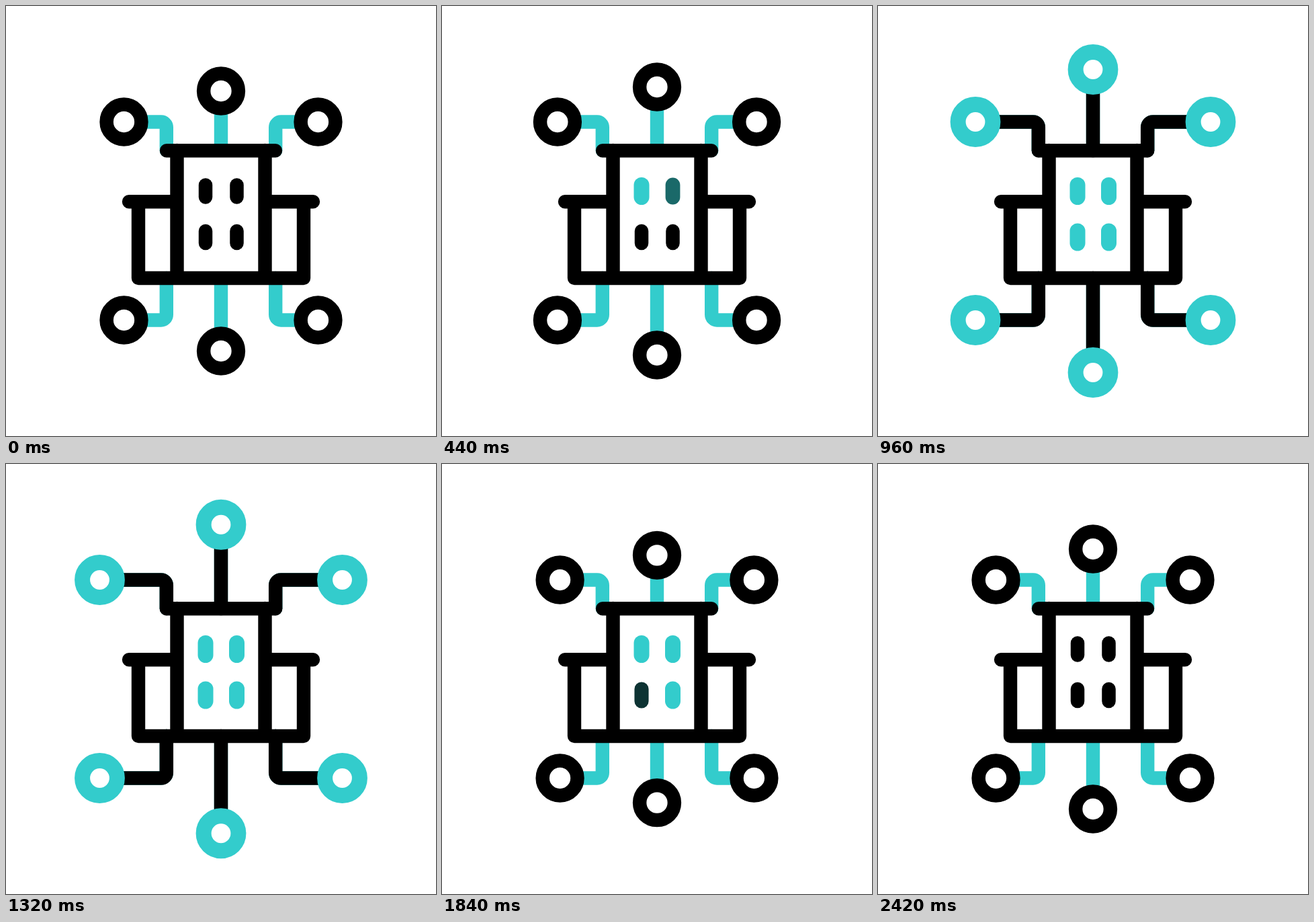
Animation, 640 px wide and 640 px high, one loop 2800 ms. Source, as an HTML page with a canvas:

```html
<!DOCTYPE html>
<html>
<head>
<meta charset="utf-8">
<style>
  html, body { margin: 0; width: 100%; height: 100%; overflow: hidden; background: #fff; }
  canvas { display: block; }
</style>
</head>
<body>
<canvas id="stage" width="640" height="640"></canvas>
<script>
const ctx = document.getElementById('stage').getContext('2d');
const LOOP = 2800, TEAL = 'rgb(51,204,204)', BLACK = '#000';

// [time, offset] keys: positive moves a node towards the building
const SIDE = [[0, 0], [200, 14], [540, -12.5], [660, -20], [960, -30.5], [1080, -33],
  [1500, -37], [1690, -37], [1920, 14], [2040, 1], [2170, -9.5], [2420, 0]];
const MIDDLE = [[0, 0], [200, 14], [540, -15.5], [660, -22.5], [960, -32], [1080, -34],
  [1500, -37], [1630, -37], [1700, -31.5], [1880, 14], [2040, -5], [2160, -8.5], [2420, 0]];

// x, y, time of turning teal, time of turning black
const WINDOWS = [[297, 266.5, 240, 2100], [343.5, 266.5, 380, 1880],
  [343.5, 335, 520, 2220], [297, 335, 700, 1760]];

const smooth = (t, start, end) => {
  const u = Math.min(1, Math.max(0, (t - start) / (end - start)));
  return u * u * (3 - 2 * u);
};
const pulse = (t, on, off, length) => smooth(t, on, on + length) - smooth(t, off, off + length);
const mix = k => `rgb(${51 * k},${204 * k},${204 * k})`;

// Monotone cubic interpolation
function track(keys, t) {
  const last = keys.length - 1;
  if (t >= keys[last][0]) return keys[last][1];
  const slope = i => (keys[i + 1][1] - keys[i][1]) / (keys[i + 1][0] - keys[i][0]);
  const tangent = i => {
    if (i === 0 || i === last) return 0;
    const a = slope(i - 1), b = slope(i);
    return a * b > 0 ? 2 * a * b / (a + b) : 0;
  };
  const i = keys.findIndex(key => key[0] > t) - 1;
  const [t0, v0] = keys[i], [t1, v1] = keys[i + 1];
  const h = t1 - t0, u = (t - t0) / h, s = u * u * (3 - 2 * u);
  return v0 + (v1 - v0) * s
    + h * u * (1 - u) * ((1 - u) * tangent(i) - u * tangent(i + 1));
}

function stroke(color, width, trace) {
  ctx.strokeStyle = color;
  ctx.lineWidth = width;
  ctx.beginPath();
  trace();
  ctx.stroke();
}

function line(...points) {
  for (let i = 0; i < points.length; i += 2) ctx.lineTo(points[i], points[i + 1]);
}

function getLinks(t) {
  const side = track(SIDE, t), middle = track(MIDDLE, t);
  const links = [];
  for (const [base, dir] of [[215, -1], [405, 1]]) {
    const bendY = 320 + dir * 147.5, y = 320 + dir * (193.5 - middle);
    links.push({ x: 320, y, delay: 20, length: Math.abs(y - base),
      trace: () => line(320, base, 320, y) });
    for (const s of [-1, 1]) {
      const bendX = 320 + s * 81.2, x = 320 + s * (144.5 - side);
      links.push({ x, y: bendY, delay: 0,
        length: Math.abs(bendY - base) + Math.abs(x - bendX) - 3.4,
        trace: () => {
          ctx.moveTo(bendX, base);
          ctx.arcTo(bendX, bendY, x, bendY, 8);
          ctx.lineTo(x, bendY);
        } });
    }
  }
  return links;
}

function drawBuilding() {
  ctx.fillStyle = '#fff';
  ctx.fillRect(254.5, 215, 131, 190);
  stroke(BLACK, 20.4, () => {
    for (const s of [-1, 1]) {
      ctx.moveTo(320 + s * 65.5, 215);
      line(320 + s * 65.5, 405);
      ctx.moveTo(320 + s * 65.5, 291.3);
      line(320 + s * 137, 291.3);
      ctx.moveTo(320 + s * 123, 291.3);
      line(320 + s * 123, 405, 320, 405);
    }
    ctx.moveTo(239, 215.3);
    line(401, 215.3);
  });
}

function drawSignal(link, t) {
  const from = smooth(t, 1610, 1800), to = smooth(t, 630, 840);
  if (to <= 0 || from >= 1) return;
  const reach = link.length - 36;
  const end = to < 1 ? reach * to : link.length;
  ctx.setLineDash([end - reach * from, 2000]);
  ctx.lineDashOffset = -reach * from;
  stroke(BLACK, 20.5, link.trace);
  ctx.setLineDash([]);
}

function drawNode({ x, y, delay }, t) {
  const k = pulse(t, 690 + delay, 1660 + delay, 160);
  ctx.fillStyle = '#fff';
  stroke(mix(k), 20.5 + 2.5 * k, () => {
    ctx.arc(x, y, 25.9, 0, 2 * Math.PI);
    ctx.fill();
  });
}

function draw(t) {
  ctx.fillStyle = '#fff';
  ctx.fillRect(0, 0, 640, 640);
  ctx.lineCap = ctx.lineJoin = 'round';
  const links = getLinks(t);
  links.forEach(link => stroke(TEAL, 20.4, link.trace));
  drawBuilding();
  links.forEach(link => drawSignal(link, t));
  links.forEach(link => drawNode(link, t));
  for (const [x, y, on, off] of WINDOWS) {
    const k = pulse(t, on, off, 120);
    stroke(mix(k), 20.5 + 2.5 * k, () => line(x, y, x, y + 18));
  }
}

const begin = performance.now();
function tick() {
  draw((performance.now() - begin) % LOOP);
  requestAnimationFrame(tick);
}
tick();
</script>
</body>
</html>
```
